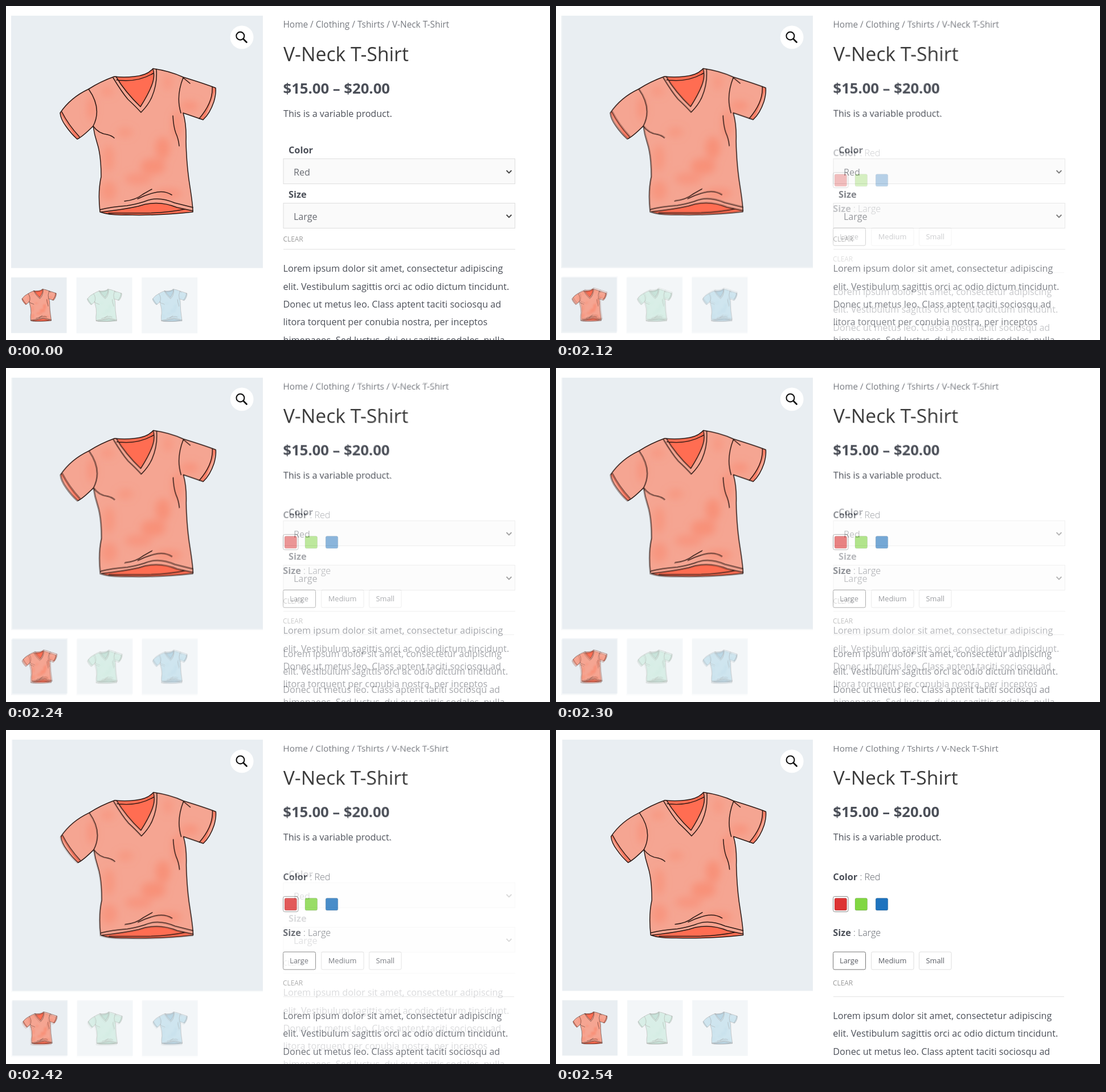
These frames come from a looping animation (955x587 px, 6.54 s). An HTML page:

```html
<!DOCTYPE html>
<html lang="en">
<head>
<meta charset="utf-8">
<title>Product page</title>
<style>
html, body { margin: 0; width: 100%; height: 100%; overflow: hidden; background: #fff; }
svg { display: block; }
text { font: 16.1px "Open Sans", "Noto Sans", sans-serif; fill: #4b4f58; white-space: pre; }
.crumb { font-size: 15.4px; fill: #777a80; }
.title { font-size: 33.8px; fill: #3a3a3a; }
.price { font-size: 25.7px; font-weight: 700; }
.bold { font-weight: 700; font-size: 16.3px; }
.value { fill: #686b72; }
.pick { font-weight: 300; fill: #5c6068; }
.clear { font-size: 11.9px; fill: #9a9a9a; }
.small { font-size: 12.8px; fill: #5a5d64; }
.about { font-size: 16.22px; }
.line { fill: none; stroke: #2b1814; stroke-width: var(--w, 1.5); stroke-linecap: round; stroke-linejoin: round; }
.red { --base: #f5a592; --wash: #fb8468; --deep: #ff6d52; }
.green { --base: #b4dfd0; --wash: #a7d9c8; --deep: #93c9b7; }
.blue { --base: #a0cde0; --wash: #8dc1da; --deep: #7ab0cc; }
.thumb { --w: 2.2; }
.off { opacity: .5; --w: 1.7; }
</style>
</head>
<body>
<svg width="955" height="587" viewBox="0 0 955 587">
  <defs>
    <filter id="soft" x="-60%" y="-60%" width="220%" height="220%"><feGaussianBlur stdDeviation="7"/></filter>
    <path id="body" d="M190 124Q165 133 145 146Q113 161 95 188Q96 199 105 211Q114 224 125 234Q134 230 153 211Q155 226 160 241Q167 262 167 300Q161 327 165 362Q182 368 210 367Q262 369 328 362Q328 350 323 318Q317 282 316 238Q317 208 311 188L346 200Q358 189 365 168Q369 154 368 144Q347 136 311 125Q287 114 258 110Q248 122 225 124Q207 126 190 124Z"/>
    <clipPath id="cut"><use href="#body"/></clipPath>

    <g id="shirt">
      <use href="#body" fill="var(--base)"/>
      <g clip-path="url(#cut)">
        <g fill="var(--wash)" filter="url(#soft)">
          <ellipse cx="275" cy="250" rx="13" ry="20" opacity=".6"/>
          <ellipse cx="258" cy="282" rx="22" ry="14" opacity=".6"/>
          <ellipse cx="232" cy="304" rx="24" ry="10" opacity=".45"/>
          <ellipse cx="180" cy="268" rx="9" ry="24" opacity=".45"/>
          <ellipse cx="180" cy="325" rx="14" ry="18" opacity=".45"/>
          <ellipse cx="285" cy="330" rx="24" ry="9" opacity=".5"/>
          <ellipse cx="209" cy="222" rx="14" ry="8" opacity=".4"/>
          <ellipse cx="300" cy="210" rx="9" ry="26" opacity=".5"/>
          <ellipse cx="150" cy="180" rx="7" ry="22" opacity=".5"/>
          <ellipse cx="178" cy="150" rx="12" ry="9" opacity=".35"/>
          <ellipse cx="322" cy="176" rx="16" ry="9" opacity=".5"/>
          <ellipse cx="284" cy="134" rx="8" ry="14" opacity=".35"/>
        </g>
        <g fill="var(--deep)">
          <path d="M193 125Q236 127 258 112L260 127Q252 154 236 177Q209 152 193 125Z"/>
          <path d="M94 186L99 187Q109 208 129 230L125 236Z" opacity=".75"/>
          <path d="M362 141L370 142L347 202L338 198Q362 171 362 141Z" opacity=".65"/>
          <path d="M167 362Q205 358 232 352Q266 340 300 354L328 360L290 368L200 369Z"/>
        </g>
      </g>
      <g class="line">
        <use href="#body"/>
        <path d="M188 126Q203 151 214 164Q228 177 237 187Q250 174 256 160Q266 137 264 111
          M193 124Q209 151 236 177Q250 155 256 139Q262 123 258 111 M194 130Q231 135 259 118
          M145 146Q169 180 153 211 M98 186Q109 208 129 230
          M311 126Q298 159 307 188 M362 142Q364 169 339 198 M311 126L323 136
          M153 211Q162 224 178 226Q186 228 190 232
          M293 193Q294 212 298 223Q303 234 304 246
          M208 343Q228 341 240 331Q249 326 256 322
          M231 339Q249 330 266 327Q280 325 291 332
          M165 358Q184 353 212 351Q226 349 242 344Q266 333 296 346L328 354
          M167 362Q205 358 232 352Q266 340 300 354L328 360
          M180 364Q225 364 250 364Q286 363 314 357"/>
      </g>
    </g>

    <g id="tile">
      <path d="M9 17H451V460.5H9Z" fill="#e9eef2"/>
      <use href="#shirt"/>
    </g>

    <g id="top">
      <use href="#tile" class="red"/>
      <circle cx="414" cy="55" r="20.5" fill="#fff"/>
      <g fill="none" stroke="#111" stroke-width="2.1">
        <circle cx="411.3" cy="52.6" r="7"/>
        <path d="M416.4 57.7L422.4 63.7" stroke-width="2.7" stroke-linecap="round"/>
      </g>
      <g class="thumb">
        <use href="#tile" class="red" transform="translate(7 473.2) scale(.2207)"/>
        <use href="#tile" class="green off" transform="translate(121.6 473.2) scale(.2217)"/>
        <use href="#tile" class="blue off" transform="translate(236.2 473.2) scale(.2217)"/>
      </g>
      <text class="crumb" x="486.5" y="38.3">Home / Clothing / Tshirts / V-Neck T-Shirt</text>
      <text class="title" x="487" y="96.8">V-Neck T-Shirt</text>
      <text class="price" x="486.5" y="153.8">$15.00 – $20.00</text>
      <text x="487" y="194.8">This is a variable product.</text>
    </g>

    <g id="about">
      <path d="M487 427.5H894" stroke="#e2e2e2"/>
      <text class="about" x="486.5" y="467">Lorem ipsum dolor sit amet, consectetur adipiscing</text>
      <text class="about" x="486.5" y="498.5">elit. Vestibulum sagittis orci ac odio dictum tincidunt.</text>
      <text class="about" x="486.5" y="530">Donec ut metus leo. Class aptent taciti sociosqu ad</text>
      <text class="about" x="486.5" y="561.3">litora torquent per conubia nostra, per inceptos</text>
      <text class="about" x="486.5" y="592.7">himenaeos. Sed luctus, dui eu sagittis sodales, nulla</text>
    </g>

    <g id="select">
      <rect x="487" y="268.5" width="406.5" height="44" fill="#fafafa" stroke="#dedede"/>
      <path d="M878.6 289L883 293.4L887.4 289" fill="none" stroke="#444" stroke-width="1.9"/>
    </g>
  </defs>

  <g>
    <use href="#top"/>
    <text class="bold" x="496" y="258.5">Color</text>
    <use href="#select"/>
    <text class="value" x="505" y="297.5">Red</text>
    <text class="bold" x="496" y="336.5">Size</text>
    <use href="#select" y="78"/>
    <text class="value" x="505" y="375.8">Large</text>
    <text class="clear" x="486.5" y="414">CLEAR</text>
    <use href="#about"/>
  </g>

  <g id="next">
    <path d="M0 0H955V587H0Z" fill="#fff"/>
    <g transform="translate(451 17) scale(.9955) translate(-451 -17)">
      <use href="#top"/>
      <use href="#about" y="43.2"/>
    </g>
    <text x="486.3" y="263.8"><tspan class="bold">Color</tspan><tspan class="pick"> : Red</tspan></text>
    <rect x="486.5" y="292.5" width="26.5" height="27" rx="3" fill="#fff" stroke="#8a8a8a"/>
    <g stroke="#000" stroke-opacity=".15">
      <rect x="489" y="295.5" width="21.5" height="21.5" rx="2.5" fill="#dd3333"/>
      <rect x="525" y="295.5" width="21.5" height="21.5" rx="2.5" fill="#81d742"/>
      <rect x="561.2" y="295.5" width="21.5" height="21.5" rx="2.5" fill="#1e73be"/>
    </g>
    <text x="486.3" y="361.5"><tspan class="bold">Size</tspan><tspan class="pick"> : Large</tspan></text>
    <g fill="#fff" stroke="#dedede">
      <rect x="486.5" y="390" width="57" height="31" rx="2.5" stroke="#777"/>
      <rect x="553.5" y="390" width="74.5" height="31" rx="2.5"/>
      <rect x="637.5" y="390" width="56.5" height="31" rx="2.5"/>
    </g>
    <text class="small" x="498" y="410.3">Large</text>
    <text class="small" x="565.8" y="410.3">Medium</text>
    <text class="small" x="649.5" y="410.3">Small</text>
    <text class="clear" x="486" y="449.2">CLEAR</text>
  </g>
</svg>
<script>
const LOOP = 6540, START = 2000, STEP = 60, STEPS = 10;
const next = document.getElementById("next");
const origin = performance.now();

// The second state dissolves in over ten equal steps.
function draw() {
  const t = (performance.now() - origin) % LOOP;
  const step = Math.floor((t - START) / STEP) + 1;
  next.style.opacity = Math.max(0, Math.min(STEPS, step)) / STEPS;
  requestAnimationFrame(draw);
}
draw();
</script>
</body>
</html>
```
